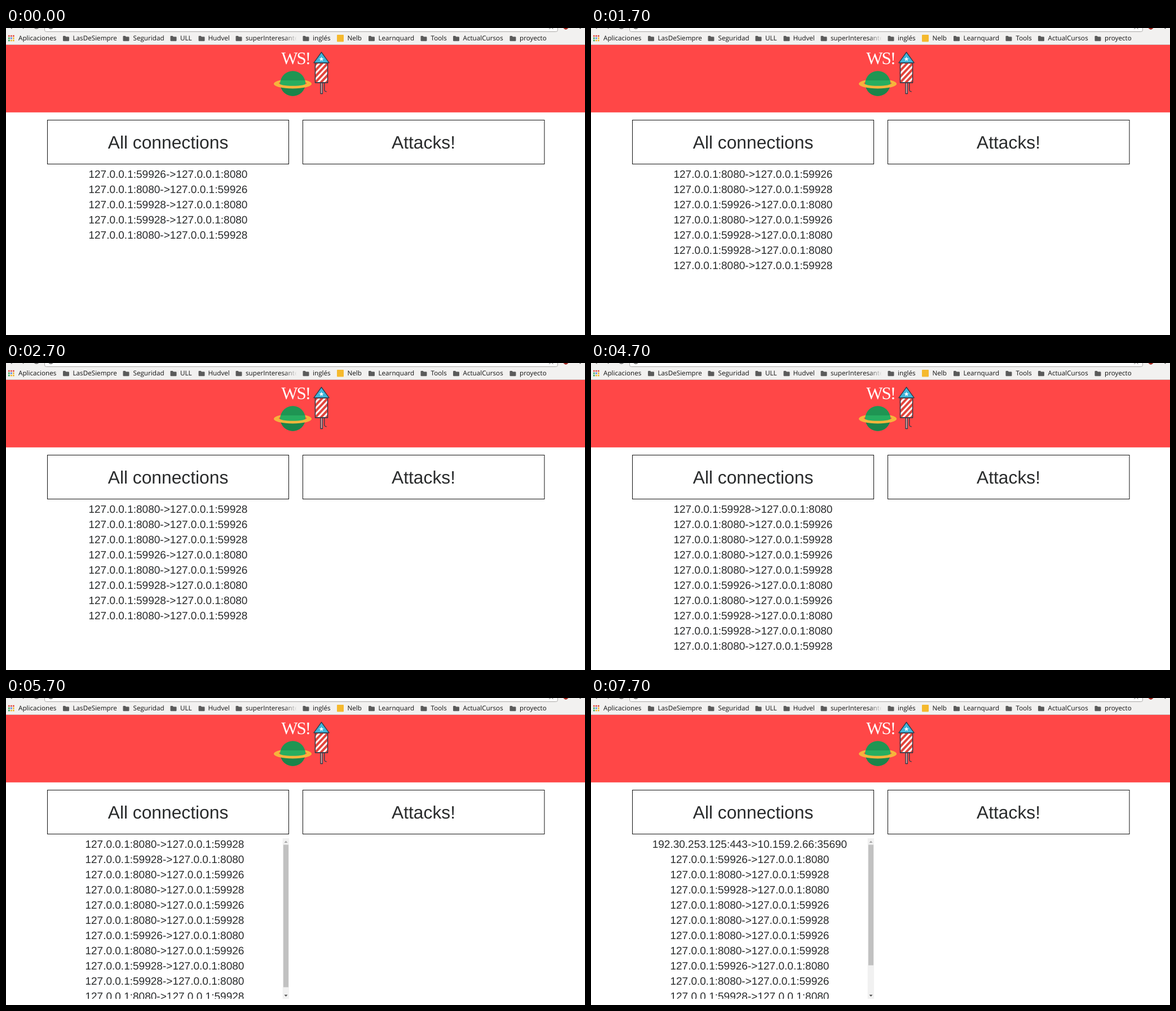
Animation of 1027 by 545 pixels, one loop 8 s. Source, as an HTML page:

```html
<!DOCTYPE html>
<html lang="en">
<head>
<meta charset="utf-8">
<title>Connections</title>
<style>
  html, body { margin: 0; width: 100%; height: 100%; overflow: hidden; background: #fff; }
  svg { display: block; width: 1027px; height: 545px; }
  text { text-rendering: geometricPrecision; white-space: pre; }
  .mark { font: 500 11.7px "Open Sans", "Noto Sans", sans-serif; fill: #111; }
  .head { font: 31.75px "Liberation Sans", Arial, sans-serif; fill: #292b2c; text-anchor: middle; }
  .row { font: 19.04px "Liberation Sans", Arial, sans-serif; fill: #292b2c; text-anchor: middle; }
  .title { font: 31px "Liberation Serif", Times, serif; letter-spacing: -2px; fill: #fff; }
  .panel { fill: #fff; stroke: #111; }
</style>
</head>
<body>
<svg viewBox="0 0 1027 545">
  <defs>
    <linearGradient id="fade">
      <stop offset="0" stop-color="#f2f1f0" stop-opacity="0"/>
      <stop offset="1" stop-color="#f2f1f0"/>
    </linearGradient>
    <clipPath id="ball"><circle cx="508.7" cy="98.5" r="22.3"/></clipPath>
    <clipPath id="front"><rect x="470" y="98.5" width="80" height="20"/></clipPath>
    <clipPath id="tube"><rect x="548.5" y="62" width="22" height="35"/></clipPath>
    <clipPath id="list"><rect x="73" y="249" width="430" height="285"/></clipPath>
    <path id="folder" d="M0 1.2Q0 0 1.2 0H4L5.5 1.6H9.8Q11 1.6 11 2.8V8Q11 9.2 9.8 9.2H1.2Q0 9.2 0 8Z" fill="#5b5b5b"/>
    <path id="ring" fill="#f6b43c" fill-rule="evenodd"
      d="M475.2 99a33.4 8.4 0 1 0 66.8 0a33.4 8.4 0 1 0 -66.8 0ZM484 98a24.6 4.8 0 1 0 49.2 0a24.6 4.8 0 1 0 -49.2 0Z"/>
  </defs>

  <!-- browser bar -->
  <rect width="1027" height="29" fill="#f2f1f0"/>
  <rect y="29" width="1027" height="1" fill="#d0c4c2"/>
  <rect x="68.5" y="-12" width="910" height="18.5" rx="3" fill="#fff" stroke="#a9a7a5"/>
  <g fill="none" stroke="#5a5a5a" stroke-width="1.4">
    <path d="M7 -2L10.5 1.2M33 -2L30 1"/>
    <path d="M49.5 -1Q54 3 58.5 -1"/>
    <path d="M75.5 -1Q79.5 3.4 83.5 -1"/>
    <path d="M963.5 1.6L967 -1L970.5 1.6" stroke-width="1"/>
  </g>
  <path d="M988.5 0H997.5Q996 2 993 3Q990 2 988.5 0Z" fill="#a52a22"/>
  <circle cx="1018.5" cy="0" r="1.4" fill="#5a5a5a"/>
  <g id="apps"></g>
  <g id="marks"></g>
  <rect x="494" y="10" width="22" height="18" fill="url(#fade)"/>
  <rect x="516" y="10" width="8" height="18" fill="#f2f1f0"/>
  <rect x="587" y="12" width="12" height="12.5" rx="1" fill="#f5b92e"/>

  <!-- banner -->
  <rect y="30" width="1027" height="119.8" fill="#ff4747"/>
  <text class="title" x="488.3" y="64">WS!</text>
  <use href="#ring"/>
  <g clip-path="url(#ball)">
    <rect x="486" y="76" width="46" height="46" fill="#1f9553"/>
    <rect x="486" y="93" width="46" height="11" fill="#27ae60"/>
    <rect x="486" y="104" width="46" height="20" fill="#1b844a"/>
  </g>
  <use href="#ring" clip-path="url(#front)"/>
  <g stroke="#2b3a48" stroke-width="1.3" stroke-linejoin="round">
    <rect x="558" y="97" width="3.4" height="19.5" fill="#d9a0a0"/>
    <path d="M564.8 97V109.5Q565 113 568.6 113" fill="none"/>
    <rect x="548.5" y="62" width="22" height="35" fill="#fff"/>
    <path d="M545.9 61.8L559.5 43L573.2 61.8Z" fill="#40b4d8"/>
  </g>
  <path id="stripes" clip-path="url(#tube)" stroke="#e2453c" stroke-width="4"/>
  <rect x="548.5" y="62" width="22" height="35" fill="none" stroke="#2b3a48" stroke-width="1.3"/>
  <path id="star" fill="#fff"/>

  <!-- panels -->
  <rect class="panel" x="73.5" y="163.5" width="428" height="78"/>
  <rect class="panel" x="526.5" y="163.5" width="428.5" height="78"/>
  <text class="head" x="287.5" y="213.5">All connections</text>
  <text class="head" x="740.5" y="213.5">Attacks!</text>

  <g clip-path="url(#list)">
    <g id="rows"></g>
    <g id="bar">
      <rect x="490.7" y="249" width="11.3" height="285" fill="#f1f1f1"/>
      <path d="M493.5 257L496.5 253.6L499.5 257Z" fill="#a3a3a3"/>
      <path d="M493.5 526.7L496.5 530L499.5 526.7Z" fill="#505050"/>
      <rect id="thumb" x="492" y="260.5" width="9" fill="#c1c1c1"/>
    </g>
  </g>
</svg>
<script>
const $ = id => document.getElementById(id);

function add(parent, tag, attrs, text) {
  const el = document.createElementNS("http://www.w3.org/2000/svg", tag);
  for (const k in attrs) el.setAttribute(k, attrs[k]);
  if (text) el.textContent = text;
  parent.appendChild(el);
  return el;
}

// bookmarks: label, text x, folder x
const marks = [
  ["Aplicaciones", 22], ["LasDeSiempre", 118.5, 101], ["Seguridad", 225.5, 207.5],
  ["ULL", 309, 291.5], ["Hudvel", 358.5, 341.5], ["superInteresante", 425, 407.5],
  ["inglés", 544, 526.5], ["Nelb", 605.5], ["Learnquard", 660.5, 643],
  ["Tools", 753.5, 735.5], ["ActualCursos", 810.5, 793], ["proyecto", 911, 893.5]
];
for (const [label, x, icon] of marks) {
  if (icon) add($("marks"), "use", { href: "#folder", x: icon, y: 14 });
  add($("marks"), "text", { class: "mark", x, y: 22.2 }, label);
}

const dots = ["#e0483e", "#e0483e", "#e0483e", "#3aa757", "#4a86e8", "#f0b429", "#3aa757", "#f0b429", "#f0b429"];
dots.forEach((fill, i) => add($("apps"), "rect", {
  x: 4 + (i % 3) * 4, y: 12.8 + Math.floor(i / 3) * 4, width: 2.7, height: 2.7, fill
}));

let d = "";
for (let y = 66; y < 130; y += 10.5) d += `M544 ${y + 4}L575 ${y - 29}`;
$("stripes").setAttribute("d", d);

const points = Array.from({ length: 10 }, (_, i) => {
  const a = i * Math.PI / 5, r = i % 2 ? 1.8 : 4.4;
  return (559.5 + r * Math.sin(a)).toFixed(2) + " " + (55.3 - r * Math.cos(a)).toFixed(2);
});
$("star").setAttribute("d", "M" + points.join("L") + "Z");

// connections, newest first
const host = "127.0.0.1:";
const link = (from, to) => host + from + "->" + host + to;
const kinds = {
  A: link(59926, 8080), B: link(8080, 59926),
  C: link(59928, 8080), D: link(8080, 59928),
  X: "192.30.253.125:443->10.159.2.66:35690"
};
const log = [..."XADCBDBDABCCD"].map(k => kinds[k]);
const STEP = 27, VIEW = 285, TRACK = 263.6, LOOP = 8000;
const rows = log.map((_, i) => add($("rows"), "text", { class: "row", y: 265.6 + i * STEP }));

let shown = 0;
function show(count) {
  if (count === shown) return;
  shown = count;
  const list = log.slice(-count);
  const height = count * STEP;
  const scrolls = height > VIEW;
  rows.forEach((row, i) => {
    row.textContent = list[i] || "";
    row.setAttribute("x", scrolls ? 281.4 : 287.4);
  });
  $("bar").style.display = scrolls ? "" : "none";
  $("thumb").setAttribute("height", scrolls ? TRACK * VIEW / height : 0);
}

const start = performance.now();
function tick() {
  const t = (performance.now() - start) % LOOP;
  show(5 + Math.floor((t + 300) / 1000));
  requestAnimationFrame(tick);
}
tick();
</script>
</body>
</html>
```
